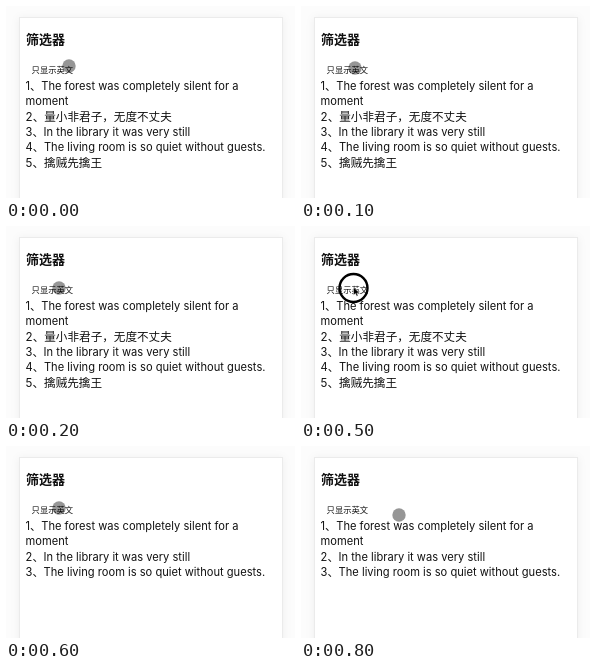
Write an HTML page that moves like this. It is 289 by 192 pixels and loops after 900 ms.

```html
<!DOCTYPE html>
<html lang="zh-CN">
<head>
<meta charset="utf-8">
<title>筛选器</title>
<style>
  html, body { margin: 0; width: 100%; height: 100%; overflow: hidden; background: #fcfcfc; }
  svg { display: block; width: 289px; height: 192px; }
  text { font-family: Inter, "Noto Sans CJK SC", "Noto Sans CJK", sans-serif; fill: #111; }
  .card { fill: #fff; stroke: #ebebeb; filter: drop-shadow(0 1px 4px rgba(0, 0, 0, .06)); }
  .title { font-size: 13px; font-weight: 700; }
  .button { font-size: 8.3px; }
  .latin { font-size: 11.13px; }
  .han { font-size: 11.6px; }
</style>
</head>
<body>
<svg viewBox="0 0 289 192">
  <rect class="card" x="13.5" y="11.5" width="263" height="200"/>
  <text class="title" x="20" y="38.2">筛选器</text>
  <text class="button" x="25.6" y="66.7">只显示英文</text>
  <g id="list"></g>
  <circle id="dot" r="6.7" fill="#000" fill-opacity=".41"/>
  <g id="click" transform="translate(52.5 62)">
    <circle r="14" fill="none" stroke="#000" stroke-width="2.4"/>
    <path d="M0 -1V7.2L1.9 5.5L3.2 8.3L4.6 7.6L3.4 5H6Z" fill="#000" stroke="#fff" stroke-width=".5"/>
  </g>
</svg>
<script>
const LOOP = 900, CLICK_START = 500, CLICK_END = 600;
const LINE_TOP = 84, LINE_HEIGHT = 15.3;
const sentences = [
  "The forest was completely silent for a\nmoment",
  "量小非君子，无度不丈夫",
  "In the library it was very still",
  "The living room is so quiet without guests.",
  "擒贼先擒王",
];
const isEnglish = s => /^[A-Za-z]/.test(s);

// Pointer positions, each held until the next start time.
const stops = [
  { at: 0, x: 63, y: 60 },
  { at: 100, x: 54, y: 62 },
  { at: 200, x: 53, y: 62 },
  { at: 800, x: 98, y: 69 },
];

const list = document.getElementById("list");
const dot = document.getElementById("dot");
const click = document.getElementById("click");
let filtered = null;

function renderList(items) {
  const lines = items.flatMap((s, i) =>
    `${i + 1}、${s}`.split("\n").map(text => ({ text, kind: isEnglish(s) ? "latin" : "han" })));
  list.innerHTML = lines.map(({ text, kind }, row) =>
    `<text class="${kind}" x="19.6" y="${LINE_TOP + row * LINE_HEIGHT}">${text}</text>`).join("");
}

function draw() {
  const t = performance.now() % LOOP;
  const clicking = t >= CLICK_START && t < CLICK_END;
  const englishOnly = t >= CLICK_END;

  if (englishOnly !== filtered) {
    filtered = englishOnly;
    renderList(filtered ? sentences.filter(isEnglish) : sentences);
  }
  const { x, y } = stops.findLast(stop => stop.at <= t);
  dot.setAttribute("cx", x);
  dot.setAttribute("cy", y);
  dot.style.display = clicking ? "none" : "";
  click.style.display = clicking ? "" : "none";
  requestAnimationFrame(draw);
}
draw();
</script>
</body>
</html>
```
